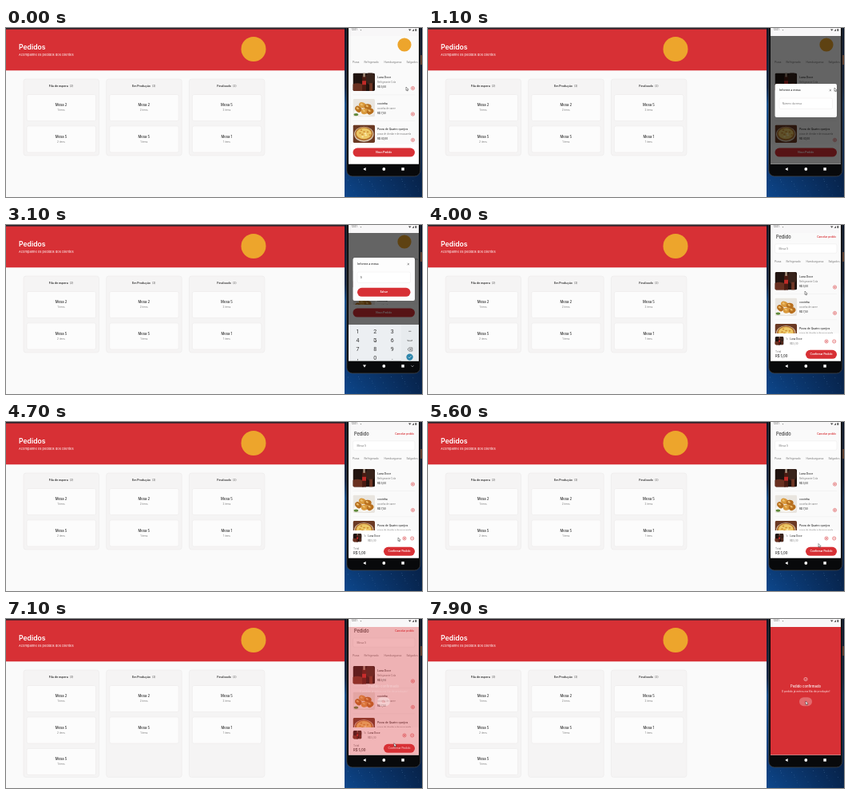
Recreate the animation shown at these times as an HTML page with a canvas. Size 521 by 212 pixels, loop 8 s.

```html
<!DOCTYPE html>
<html lang="pt">
<head>
<meta charset="utf-8">
<title>Pedidos</title>
<style>
html, body { margin: 0; width: 100%; height: 100%; overflow: hidden; background: #fafafa; }
canvas { display: block; width: 521px; height: 212px; }
</style>
</head>
<body>
<canvas id="stage"></canvas>
<script>
const W = 521, H = 212, LOOP = 8000;
const RED = '#d73035', INK = '#333', GREY = '#777';
const BAR = 10, BASE = 170.4; // phone screen: below the status bar, above the nav bar
const canvas = document.getElementById('stage');
const dpr = window.devicePixelRatio || 1;
canvas.width = W * dpr;
canvas.height = H * dpr;
const c = canvas.getContext('2d');

// Moments at which the screens change
const T = { modal: 700, keys: 1600, typed: 2800, order: 3900, done: 7000, served: 7000 };

// Pointer path: time, x, y
const PATH = [
  [0, 501, 74], [400, 508, 75], [1150, 509, 75], [1550, 464, 94], [2050, 464, 95],
  [2600, 461, 142], [3150, 461, 142], [3650, 472, 83], [4000, 472, 83],
  [4600, 491, 145], [5300, 491, 145], [5900, 487, 160], [7000, 487, 160],
  [7600, 473, 103], [8000, 473, 103]
];

const clamp = v => Math.max(0, Math.min(1, v));
const ease = v => { v = clamp(v); return v * v * (3 - 2 * v); };
const mix = (a, b, k) => a + (b - a) * k;
const ramp = (t, start, len) => ease((t - start) / len);

function rect(x, y, w, h, fill) {
  c.fillStyle = fill;
  c.fillRect(x, y, w, h);
}

function round(x, y, w, h, r, fill, line, lw = 0.5) {
  c.beginPath();
  c.roundRect(x, y, w, h, r);
  if (fill) { c.fillStyle = fill; c.fill(); }
  if (line) { c.strokeStyle = line; c.lineWidth = lw; c.stroke(); }
}

function disc(x, y, r, fill, line, lw = 0.6) {
  c.beginPath();
  c.arc(x, y, r, 0, Math.PI * 2);
  if (fill) { c.fillStyle = fill; c.fill(); }
  if (line) { c.strokeStyle = line; c.lineWidth = lw; c.stroke(); }
}

function oval(x, y, rx, ry, fill, turn = 0) {
  c.beginPath();
  c.ellipse(x, y, rx, ry, turn, 0, Math.PI * 2);
  c.fillStyle = fill;
  c.fill();
}

function poly(points, color, filled, lw = 0.6) {
  c.beginPath();
  points.forEach(([x, y], i) => i ? c.lineTo(x, y) : c.moveTo(x, y));
  if (filled) { c.closePath(); c.fillStyle = color; c.fill(); }
  else { c.strokeStyle = color; c.lineWidth = lw; c.stroke(); }
}

function text(s, x, y, size, color = INK, weight = 400, align = 'left', family = 'Inter') {
  c.font = `${weight} ${size}px ${family}, sans-serif`;
  c.textAlign = align;
  c.textBaseline = 'middle';
  c.fillStyle = color;
  c.fillText(s, x, y);
}

function clip(x, y, w, h, r, draw) {
  c.save();
  c.beginPath();
  c.roundRect(x, y, w, h, r);
  c.clip();
  draw();
  c.restore();
}

function logo(x, y, r) {
  disc(x, y, r, '#eda52c');
}

/* ---------- order board ---------- */

const COLUMNS = [
  ['Fila de espera', [['Mesa 2', 1], ['Mesa 5', 2]]],
  ['Em Produção', [['Mesa 2', 2], ['Mesa 5', 1]]],
  ['Finalizado', [['Mesa 5', 2], ['Mesa 1', 1]]]
];

function board(t) {
  rect(0, 0, 424, H, '#fafafa');
  rect(0, 0, 424, 2, '#26232b');
  rect(0, 1.6, 424, 51.7, RED);
  text('Pedidos', 16, 24.6, 8.6, '#fff', 600);
  text('Acompanhe os pedidos dos clientes', 16, 34.1, 4, '#fff');
  logo(310, 26.5, 15.5);

  const served = t >= T.served;
  COLUMNS.forEach(([name, orders], i) => {
    const x = 22 + i * 103.7, mid = x + 47;
    const list = i === 0 && served ? [...orders, ['Mesa 5', 1]] : orders;
    round(x, 64, 94.5, served ? 134.5 : 96, 3, '#f5f4f4', '#e8e6e6');
    c.font = '600 3.6px Inter, sans-serif';
    const w = c.measureText(name).width;
    const left = mid - (w + 6.5) / 2;
    text(name, left, 72.8, 3.6, INK, 600);
    text(`(${list.length})`, left + w + 2, 72.8, 3.5, '#555');
    list.forEach(([table, n], k) => {
      const y = 83.5 + k * 39.5;
      round(x + 4, y, 86.5, 33, 2, '#fcfcfc', '#e9e7e7');
      text(table, mid, y + 13.6, 4.2, INK, 500, 'center');
      text(`${n} itens`, mid, y + 20, 3.1, GREY, 400, 'center');
    });
  });
}

/* ---------- desktop and phone body ---------- */

function desktop() {
  const sky = c.createLinearGradient(0, 0, 0, H);
  sky.addColorStop(0, '#0a1222');
  sky.addColorStop(0.35, '#12294a');
  sky.addColorStop(0.45, '#174f8c');
  sky.addColorStop(0.85, '#0c3c78');
  sky.addColorStop(1, '#0d478c');
  rect(424, 0, 97, H, sky);
  const shade = c.createLinearGradient(424, 0, W, 0);
  shade.addColorStop(0, 'rgba(4,16,40,0)');
  shade.addColorStop(1, 'rgba(4,16,40,.6)');
  rect(424, 0, 97, H, shade);
  for (let i = 0; i < 36; i++) {
    const x = 425 + (i * 37.3) % 95, y = 187 + (i * 17.9) % 24;
    rect(x, y, 0.7, 0.7, `rgba(150,195,240,${0.15 + (i % 4) * 0.1})`);
  }
  rect(519, 34, 2, 12, '#5a3a2c');
}

function body(keys) {
  round(426.8, -12, 92, 198, 7, '#08090b', '#45484d', 0.7);
  const y = 177;
  if (keys) {
    poly([[447, 175.5], [451, 175.5], [449, 178.8]], '#fff', true);
    poly([[507.4, 176.3], [509, 177.8], [510.6, 176.3]], '#ddd');
  } else {
    poly([[450.6, 175], [450.6, 179], [447.2, 177]], '#fff', true);
  }
  disc(473.3, y, 1.9, '#fff');
  rect(495.3, 175.2, 3.5, 3.5, '#fff');
}

function statusBar() {
  rect(429, 0, 88, BAR, '#f8f7f8');
  text('12:21', 432.5, 2.6, 3, '#444', 400, 'left', 'Roboto');
  disc(444.5, 2.6, 0.6, '#777');
  poly([[504, 1.4], [507.4, 1.4], [505.7, 3.8]], '#444', true);
  poly([[508.6, 3.8], [511, 3.8], [511, 1.2]], '#444', true);
  rect(512.5, 1.1, 1.6, 2.8, '#444');
}

/* ---------- menu ---------- */

function sodaPic() {
  rect(0, 0, 28, 23, '#20130f');
  oval(6, 19, 10, 6, '#693020');
  oval(22, 7, 6, 8, '#38231b');
  round(11.8, 3, 5, 22, 2, '#4a1b12');
  rect(13, 0, 2.6, 5, '#a5907c');
  rect(11.8, 10, 5, 5, '#c02a27');
  rect(21, 13, 4, 10, '#6e3524');
}

function snackPic() {
  rect(0, 0, 28, 23, '#e9e5df');
  oval(14, 17, 13, 5, '#f8f6f2');
  [[7, 13], [12, 8], [19, 10], [15, 16], [22, 16]].forEach(([x, y], i) => {
    oval(x, y, 4.6, 3.6, i % 2 ? '#d9993c' : '#b8701f', 0.7 - i * 0.3);
    oval(x - 1, y - 1, 1.8, 1.2, '#edbd69', 0.5);
  });
  oval(4, 20, 3, 1.6, '#5f8a3c');
}

function pizzaPic() {
  rect(0, 0, 28, 23, '#6b3a24');
  oval(14, 12, 12.5, 9.6, '#d9cbb8');
  oval(14, 11.5, 11.4, 8.6, '#b5732f');
  oval(14, 11.2, 9.6, 7, '#ecc866');
  for (let i = 0; i < 9; i++) {
    const a = i * 2.4, r = 1.5 + i * 0.65;
    oval(14 + Math.cos(a) * r * 1.2, 11 + Math.sin(a) * r * 0.8, 1.3, 0.9, i % 3 ? '#cf8a32' : '#fbe9b0');
  }
}

const ITEMS = [
  ['Luna Doce', 'Refrigerante Cola', 'R$ 5,00', sodaPic],
  ['coxinha', 'coxinha de carne', 'R$ 7,50', snackPic],
  ['Pizza de Quatro queijos', 'pizza de chedar e de mussarela', 'R$ 43,00', pizzaPic]
];

function picture(draw, x, y, w, h) {
  clip(x, y, w, h, 1.8, () => {
    c.translate(x, y);
    c.scale(w / 28, h / 23);
    draw();
  });
}

function sign(x, y, plus) {
  disc(x, y, 2.1, null, RED, 0.55);
  poly([[x - 1, y], [x + 1, y]], RED, false, 0.55);
  if (plus) poly([[x, y - 1], [x, y + 1]], RED, false, 0.55);
}

function menu(top) {
  [['Pizza', 434], ['Refrigerado', 448.5], ['Hamburguesa', 473.5], ['Salgados', 501.5]]
    .forEach(([s, x]) => text(s, x, top - 13, 3.3, '#777'));
  ITEMS.forEach(([name, info, price, draw], i) => {
    const y = top + i * 32.5;
    picture(draw, 434.5, y, 27.5, 22.5);
    text(name, 465, y + 5.7, 3.4, INK, 500);
    text(info, 465, y + 11.7, 2.8, GREY);
    text(price, 465, y + 17.6, 3, INK, 500);
    sign(509.5, y + 19, true);
    if (i < 2) rect(434.5, y + 27.3, 77.5, 0.3, '#e2e0e0');
  });
}

function pill(s, x, y, w, h, size = 3.3) {
  round(x, y, w, h, h / 2, RED);
  text(s, x + w / 2, y + h / 2 + 0.1, size, '#fff', 600, 'center');
}

function home(bottom) {
  rect(429, 0, 88, 171, '#fafafa');
  logo(499, 21, 8.6);
  menu(56.5);
  rect(429, bottom - 25, 88, 60, '#fff');
  pill('Novo Pedido', 434.5, bottom - 20.4, 77.5, 11);
}

/* ---------- table dialog ---------- */

function dialog(t) {
  const show = ramp(t, T.modal, 250);
  const up = ramp(t, T.keys, 250);
  const typed = t >= T.typed;
  rect(429, BAR, 88, 162, `rgba(0,0,0,${0.6 * show})`);
  c.save();
  c.globalAlpha = show;
  const y = typed ? 41 : mix(70, 47, up);
  round(434.5, y, 77.5, typed ? 54 : 42, 2, '#fdfdfd');
  text('Informe a mesa', 440, y + 8.2, 3.6, INK, 500);
  poly([[502.7, y + 7], [504.9, y + 9.2]], '#555');
  poly([[504.9, y + 7], [502.7, y + 9.2]], '#555');
  round(440, y + 18, 66.5, 13.5, 1.8, '#fff', '#e8e6e6', 0.4);
  if (typed) text('5', 443.7, y + 25, 3.5, INK);
  else text('Número da mesa', 443.7, y + 25, 3, '#777');
  if (t >= T.keys && Math.floor((t - T.keys) / 500) % 2 === 0) {
    rect(typed ? 446.2 : 443.1, y + 23, 0.4, 4, '#444');
  }
  if (typed) pill('Salvar', 440, y + 37.8, 66.5, 11, 3.2);
  c.restore();
}

function keyboard(k, t) {
  const top = mix(BASE, 125, k);
  rect(429, top, 88, 47, '#eceff2');
  rect(495, top, 22, 47, '#e7ebee');
  if (t >= T.typed - 90 && t < T.typed + 60) disc(462, top + 19.5, 5, '#d3d8dd');
  ['123', '456', '789', ',0.'].forEach((row, r) => {
    [...row].forEach((key, i) =>
      text(key, 440.4 + i * 21.7, top + 8.6 + r * 11.2, 7, '#333', 400, 'center', 'Roboto'));
  });
  poly([[504.2, top + 8.3], [507.4, top + 8.3]], '#444');
  poly([[503, top + 19], [503, top + 20.2], [508.5, top + 20.2], [508.5, top + 19]], '#444');
  poly([[503, top + 31], [504.8, top + 28.9], [508.8, top + 28.9], [508.8, top + 33.1], [504.8, top + 33.1], [503, top + 31]], '#444');
  poly([[505.4, top + 30], [507.4, top + 32]], '#444');
  poly([[507.4, top + 30], [505.4, top + 32]], '#444');
  disc(505.6, top + 40.6, 4.2, '#2d86ac');
  poly([[503.8, top + 40.6], [505.1, top + 41.9], [507.6, top + 39.2]], '#fff');
}

/* ---------- order and confirmation ---------- */

function order() {
  rect(429, 0, 88, 171, '#fafafa');
  text('Pedido', 436, 15, 5.6, INK, 500);
  text('Cancelar pedido', 511, 15, 3, RED, 600, 'right');
  round(434.5, 23.8, 77.5, 11.5, 1.8, '#fff', '#e5e3e3', 0.4);
  text('Mesa 5', 439.5, 29.7, 3.3, GREY);
  menu(59);
  rect(429, 136, 88, 35, '#fff');
  picture(sodaPic, 434.5, 140, 11, 10.5);
  text('1x', 448.2, 143, 2.8, GREY);
  text('Luna Doce', 453.2, 143, 3, INK, 500);
  text('R$ 5,00', 453.2, 148.8, 2.8, GREY);
  sign(499, 146, true);
  sign(508.7, 146, false);
  text('Total', 435, 159.5, 3.2, GREY);
  text('R$ 5,00', 435, 165, 4.2, INK, 500);
  pill('Confirmar Pedido', 473, 156.8, 39, 11, 3.3);
}

function confirmed(t) {
  rect(429, 0, 88, 171, RED);
  disc(473, 75.5, 2.1, null, '#fff', 0.5);
  poly([[472, 75.6], [472.7, 76.3], [474.1, 74.8]], '#fff', false, 0.5);
  text('Pedido confirmado', 473, 84.4, 4.2, '#fff', 500, 'center');
  text('O pedido já entrou na fila de produção!', 473, 91, 3.3, '#fdeaea', 400, 'center');
  const pressed = t > 7700;
  round(465, 98.2, 16, 11, 5.5, pressed ? 'rgba(255,255,255,.28)' : '#fff');
  text('Ok', 473, 103.8, 3.2, pressed ? '#e25a5e' : RED, 600, 'center');
}

function pointer(t) {
  let i = 0;
  while (i < PATH.length - 2 && PATH[i + 1][0] <= t) i++;
  const [t0, x0, y0] = PATH[i], [t1, x1, y1] = PATH[i + 1];
  const k = ease((t - t0) / (t1 - t0));
  const x = mix(x0, x1, k), y = mix(y0, y1, k);
  const arrow = [[0, 0], [0, 4.4], [1, 3.5], [1.7, 5], [2.4, 4.7], [1.8, 3.2], [3.1, 3.1], [0, 0]]
    .map(([dx, dy]) => [x + dx, y + dy]);
  poly(arrow, '#fff', true);
  poly(arrow, '#222', false, 0.45);
}

function phone(t) {
  const keys = t < T.order ? ramp(t, T.keys, 250) : 0;
  body(keys > 0);
  clip(429, -4, 88, BASE + 4, 0, () => {
    if (t < T.order) {
      home(mix(171, 125, keys));
      if (t >= T.modal) dialog(t);
      if (keys > 0) keyboard(keys, t);
    } else {
      order();
      if (t >= T.done) {
        c.save();
        c.globalAlpha = ramp(t, T.done, 250);
        confirmed(t);
        c.restore();
      }
    }
    statusBar();
  });
}

function frame(now) {
  const t = now % LOOP;
  c.setTransform(dpr, 0, 0, dpr, 0, 0);
  board(t);
  desktop();
  phone(t);
  pointer(t);
}

const start = performance.now();
function tick() {
  frame(performance.now() - start);
  requestAnimationFrame(tick);
}
tick();
</script>
</body>
</html>
```
